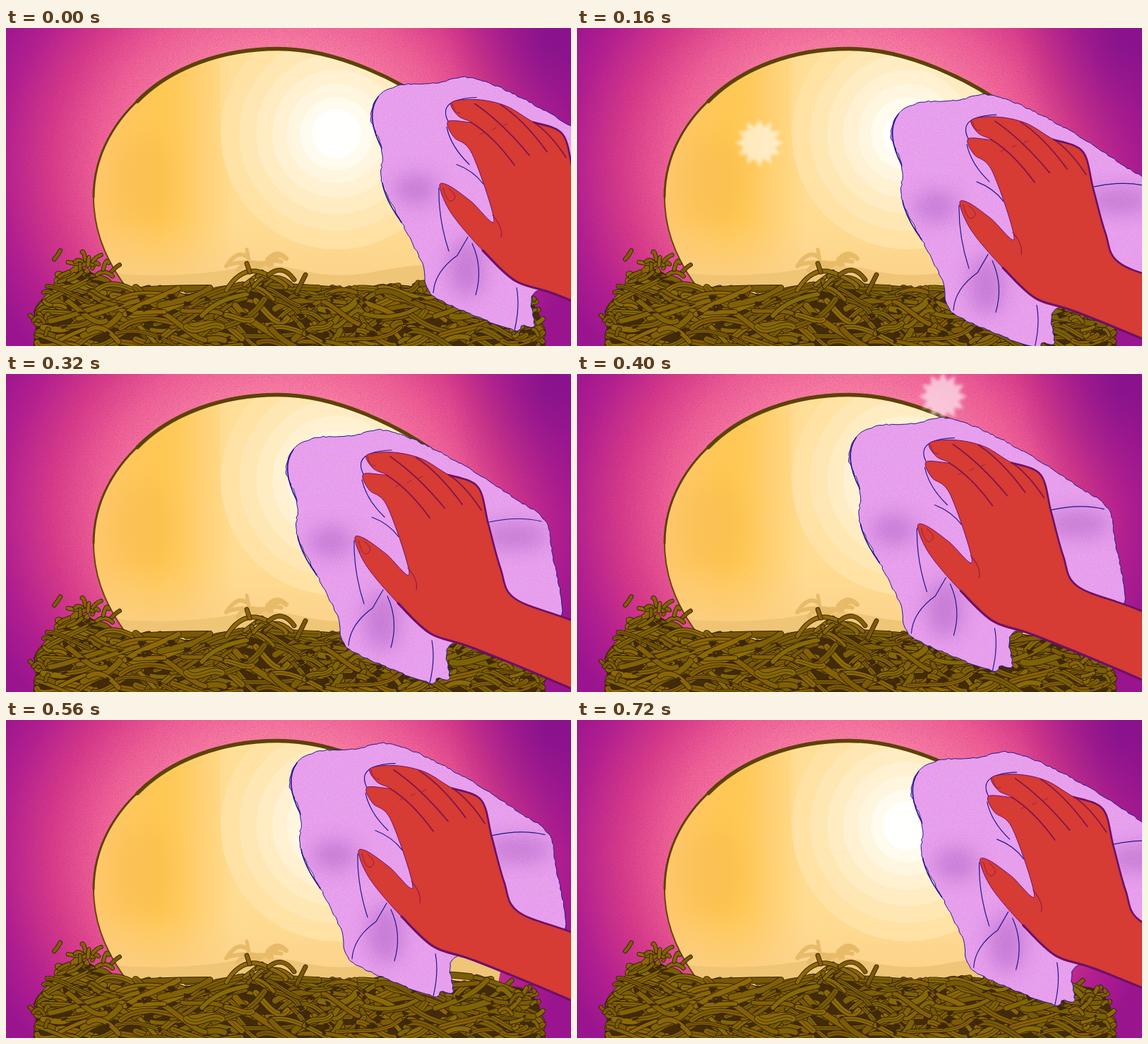
An HTML page for the animation above (0.8 s loop, 800 by 451 pixels).

```html
<!DOCTYPE html>
<html lang="en">
<head>
<meta charset="utf-8">
<title>Polishing the egg</title>
<style>
html,body{margin:0;width:100%;height:100%;overflow:hidden;background:#a0188f}
svg{display:block;width:100%;height:100%}
path{stroke-linecap:round;stroke-linejoin:round}
</style>
</head>
<body>
<svg viewBox="0 0 800 451" preserveAspectRatio="none">
<defs>
  <radialGradient id="sky" gradientUnits="userSpaceOnUse" cx="0" cy="0" r="1" gradientTransform="translate(385 195) scale(450 410)">
    <stop offset=".42" stop-color="#f97f9f"/><stop offset=".57" stop-color="#ef6293"/>
    <stop offset=".72" stop-color="#d63c86"/><stop offset=".87" stop-color="#b2218d"/>
    <stop offset="1" stop-color="#99168d"/>
  </radialGradient>
  <radialGradient id="dusk" gradientUnits="userSpaceOnUse" cx="0" cy="0" r="1" gradientTransform="translate(765 20) scale(140 180)">
    <stop offset="0" stop-color="#6c0f88" stop-opacity=".5"/><stop offset="1" stop-color="#7c1188" stop-opacity="0"/>
  </radialGradient>
  <linearGradient id="shell" gradientUnits="userSpaceOnUse" x1="124" y1="0" x2="324" y2="0">
    <stop offset="0" stop-color="#fec76c"/><stop offset=".45" stop-color="#ffc752"/>
    <stop offset=".62" stop-color="#ffcb5e"/><stop offset=".75" stop-color="#ffd071"/>
    <stop offset="1" stop-color="#ffdc92"/>
  </linearGradient>
  <linearGradient id="low" gradientUnits="userSpaceOnUse" x1="0" y1="270" x2="0" y2="360">
    <stop offset="0" stop-color="#fcd28a" stop-opacity="0"/><stop offset="1" stop-color="#fbd08a" stop-opacity=".85"/>
  </linearGradient>
  <filter id="grain" x="0" y="0" width="100%" height="100%">
    <feTurbulence type="fractalNoise" baseFrequency=".75" numOctaves="2" seed="4"/>
    <feColorMatrix values="0 0 0 0 .4  0 0 0 0 0  0 0 0 0 .45  2.4 0 0 0 -1.1"/>
  </filter>
  <filter id="soft" x="-60%" y="-60%" width="220%" height="220%"><feGaussianBlur stdDeviation="14"/></filter>
  <filter id="glow" x="-30%" y="-30%" width="160%" height="160%"><feGaussianBlur stdDeviation="2.2"/></filter>
  <clipPath id="eggClip"><path id="eggEdge"/></clipPath>
  <clipPath id="clothClip"><path id="clothEdge"/></clipPath>
</defs>
<rect width="800" height="451" fill="url(#sky)"/>
<rect width="800" height="451" fill="url(#dusk)"/>
<rect width="800" height="451" filter="url(#grain)" opacity=".32"/>
<g id="egg"></g>
<path id="star" fill="#fff" filter="url(#glow)"/>
<g id="nest"></g>
<g id="wipe"></g>
</svg>
<script>
const STEP = 80, STEPS = 10;
const $ = id => document.getElementById(id);
const fix = v => v.toFixed(1);
const repeat = (n, draw) => Array.from({ length: n }, (_, i) => draw(i)).join('');

let seed = 11;
const rnd = (a, b) => {
  seed = (seed * 16807) % 2147483647;
  return a + (b - a) * seed / 2147483647;
};

// Smooth curve through "x,y x,y ..."
function curve(text, closed) {
  const p = text.trim().split(/\s+/).map(q => q.split(',').map(Number)), n = p.length;
  const at = i => closed ? p[(i + n) % n] : p[Math.max(0, Math.min(n - 1, i))];
  let d = 'M' + p[0];
  for (let i = 0; i < (closed ? n : n - 1); i++) {
    const [a, b, c, e] = [at(i - 1), at(i), at(i + 1), at(i + 2)];
    const handle = (o, from, to) => o.map((v, k) => fix(v + (to[k] - from[k]) / 6));
    d += `C${handle(b, a, c)} ${handle(c, e, b)} ${c}`;
  }
  return d + (closed ? 'Z' : '');
}

// Frayed version of a closed path
function fray(d, amp) {
  const path = document.createElementNS('http://www.w3.org/2000/svg', 'path');
  path.setAttribute('d', d);
  const n = Math.round(path.getTotalLength() / 4.5);
  const dots = Array.from({ length: n }, (_, i) => {
    const q = path.getPointAtLength(i * 4.5);
    return fix(q.x + rnd(-amp, amp)) + ',' + fix(q.y + rnd(-amp, amp));
  });
  return 'M' + dots.join('L') + 'Z';
}

const shape = (d, fill, more = '') => `<path d="${d}" fill="${fill}" ${more}/>`;
const line = (d, color, width, more = '') =>
  shape(d, 'none', `stroke="${color}" stroke-width="${width}" ${more}`);
const blob = (x, y, rx, ry, fill, more = '') =>
  `<ellipse cx="${x}" cy="${y}" rx="${rx}" ry="${ry}" fill="${fill}" ${more}/>`;
const arc = (x, y, dx, dy, lift) =>
  `M${fix(x)} ${fix(y)}q${fix(dx / 2)} ${fix(dy / 2 - lift)} ${fix(dx)} ${fix(dy)}`;

function drawEgg() {
  const left = 'M175 374C140 330 124 285 124 240', crown = 'C124 123 241 29 385 29C470 29 560 75 610 112';
  $('eggEdge').setAttribute('d', left + crown + 'C720 195 715 310 690 400L230 410Z');
  const glow = repeat(7, i => {
    const r = 164 - 27 * i + .9 * i * i;
    return blob(468, 150, r, r, `rgb(255,${Math.min(255, 226 + 5 * i)},${164 + 15 * i})`);
  });
  const shade = '#e8bb69';
  $('egg').innerHTML = `<g clip-path="url(#eggClip)">
    <rect x="100" y="20" width="620" height="420" fill="url(#shell)"/>
    ${blob(195, 215, 45, 62, '#f5b84c', 'opacity=".35" filter="url(#soft)"')}
    <rect x="303" y="20" width="420" height="130" fill="#ffe0a0" opacity=".4"/>
    <rect x="100" y="260" width="620" height="160" fill="url(#low)"/>
    ${glow}
    ${shape('M140 346Q190 352 240 350T330 340T420 344T520 346T600 336H720V420H140Z', '#eec474', 'opacity=".85"')}
    ${repeat(7, () => line(arc(rnd(312, 385), rnd(328, 350), rnd(22, 48), rnd(-14, 8), rnd(4, 20)), shade, 6))}
    ${line('M344 330L341 314', shade, 5)}</g>
    ${line(left, '#6a4508', 2)}${line('M124 240' + crown, '#5c4206', 3)}
    ${line('M186 104C232 57 305 29.5 385 29.5C470 29.5 560 76 610 113', '#5c4206', 5.4)}`;
}

const bump = (x, at, width) => Math.exp(-(((x - at) / width) ** 2));
const roof = x => 368 - 36 * bump(x, 105, 42) - 18 * bump(x, 368, 30) - 9 * bump(x, 610, 60)
  + 75 * Math.exp((38 - x) / 9) + 75 * Math.exp((x - 766) / 11);

function drawNest() {
  const strand = (d, w) => line(d, '#35200a', w + 1.8) +
    line(d, `hsl(${rnd(42, 47)},92%,${rnd(24, 29)}%)`, w);
  const ridge = repeat(74, i => `L${40 + i * 9.8} ${fix(roof(40 + i * 9.8) + 9)}`);
  const mat = repeat(270, i => {
    const x = rnd(46, 757), y = roof(x) + rnd(0, 456 - roof(x));
    const turn = rnd(-.8, .8), len = rnd(18, 52);
    const at = (k, bend) => {
      const px = Math.max(44, Math.min(760, x + Math.cos(turn) * len * k));
      return fix(px) + ' ' + fix(Math.max(roof(px) + 1, y + Math.sin(turn) * len * k * .8 + bend));
    };
    const d = `M${at(-1, 0)}C${at(-.4, rnd(-20, 16))} ${at(.4, rnd(-16, 20))} ${at(1, rnd(-8, 8))}`;
    return strand(d, rnd(4.5, 8.5)) + (i % 2 ? line(d, '#4a3208', .8) : '');
  });
  const gaps = repeat(90, () => {
    const x = rnd(60, 745), y = roof(x) + rnd(10, 80), w = rnd(5, 15);
    return shape(arc(x, y, w, rnd(-6, 6), rnd(2, 5)) + `l${fix(-w * .7)} ${fix(rnd(2, 5))}Z`, '#3e2708');
  });
  // Loose curls that stand up from the mat
  const tuft = (n, x, y, w, h, size) => repeat(n, () =>
    strand(arc(x + rnd(0, w), y + rnd(0, h), rnd(-size, size), rnd(-size, size) * .6, rnd(-4, 14)), 4.4));
  $('nest').innerHTML = shape('M38 460' + ridge + 'L766 460Z', '#432b08') + mat + gaps +
    tuft(16, 66, 328, 84, 28, 24) + tuft(7, 46, 380, 16, 62, 16) +
    tuft(9, 700, 368, 50, 66, 18) + tuft(8, 325, 352, 60, 16, 32) +
    strand('M312 372Q335 334 368 349T396 368', 5) + strand('M372 350Q392 334 408 357', 5) +
    strand('M412 374L424 350', 5) + strand('M345 346L341 334', 5);
}

function drawWipe() {
  const ink = '#20188c', plum = '#6d1068';
  const cloth = fray(curve(`397,139 407,107 437,91 490,87 530,79 575,92 645,128 720,176 763,207
    773,250 783,355 700,365 628,385 628,432 612,431 600,438 545,418 482,387 470,345 440,285
    413,230 412,180`, true), 1);
  $('clothEdge').setAttribute('d', cloth);
  const hand = curve(`940,404 800,349 720,318 700,275 683,213 668,160 627,143 588,120 547,111
    511,115 520,134 538,143 506,142 514,164 540,188 571,283 538,255 507,233 494,234 511,273
    555,325 601,368 660,388 800,446 940,510`, true);
  const folds = ['M493 236Q492 280 507 326', 'M485 385Q487 355 519 332L534 306', 'M540 315Q556 350 545 388',
    'M603 378Q608 405 600 438', 'M684 210Q725 201 758 209', 'M506 142Q490 110 546 108',
    'M504 150Q510 178 536 203', 'M518 203Q542 212 556 231'];
  const knuckles = [arc(544, 117, 77, 73, 10), arc(538, 143, 62, 61, 12),
    arc(580, 118, 66, 67, 12), arc(627, 143, 46, 50, 10)];
  const shadow = (x, y, rx, ry) => blob(x, y, rx, ry, '#b76dcb', 'opacity=".65" filter="url(#soft)"');
  $('wipe').innerHTML = shape(cloth, '#e9a3ee', `stroke="${ink}" stroke-width="1"`) +
    `<g clip-path="url(#clothClip)">
      ${shadow(460, 238, 32, 22)}${shadow(532, 350, 26, 42)}${shadow(720, 230, 48, 19)}
      <rect x="385" y="70" width="405" height="375" filter="url(#grain)" opacity=".14"/></g>` +
    line('M407 107Q388 133 412 180', ink, 1.6) + line('M413 230Q418 255 440 285', ink, 1.6) +
    folds.map(d => line(d, ink, 1.2)).join('') +
    shape(hand, '#d63b34', `stroke="${plum}" stroke-width="1"`) +
    line(curve('627,143 668,160 683,213 700,275 720,318 800,349 940,404'), plum, 2.6) +
    line(curve('555,325 601,368 660,388 800,446 940,510'), plum, 3.2) +
    knuckles.map(d => line(d, '#7d144f', 1.7)).join('') +
    line('M499 236Q505 260 513 254T507 237', '#8e1a40', .9) +
    line('M512 117Q515 133 523 130', '#8e1a40', .9) + line('M569 275Q584 292 581 306', '#8e1a40', 1.1) +
    repeat(3, i => line(arc(552 + 16 * i, 160 - 6 * i, 6, -3, 0), '#8e1a40', .8));
}

// Sweep left, lift, then a parabolic return
function sweep(i) {
  if (i < 4) return [120 - 36 * i, -9.5 + 12.3 * i];
  if (i < 7) return [-11.6 * (i - 4), -17.25 * (i - 4)];
  const k = i - 6;
  return [-23 + 25.4 * k + 2.6 * k * k, -34.5 - 17.8 * k + 6 * k * k];
}

const sparkles = [{ from: 2, x: 258, y: 163 }, { from: 5, x: 518, y: 32 }];

function sparkle(i) {
  const s = sparkles.find(s => i >= s.from && i < s.from + 2);
  if (!s) return $('star').setAttribute('opacity', 0);
  const big = i > s.from, r = big ? 52 : 34, n = 12;
  const dots = Array.from({ length: n * 2 }, (_, k) => {
    const a = Math.PI * k / n, q = k % 2 ? r * .68 : r;
    return fix(s.x + q * Math.sin(a)) + ' ' + fix(s.y - q * Math.cos(a));
  });
  $('star').setAttribute('d', 'M' + dots.join('L') + 'Z');
  $('star').setAttribute('opacity', big ? 1 : .6);
}

let shown = -1;
function render(ms) {
  const i = Math.floor(ms / STEP) % STEPS;
  if (i === shown) return;
  shown = i;
  $('wipe').setAttribute('transform', `translate(${sweep(i).map(fix)})`);
  sparkle(i);
}

drawEgg();
drawNest();
drawWipe();
const start = performance.now();
(function tick() {
  render(performance.now() - start);
  requestAnimationFrame(tick);
})();
</script>
</body>
</html>
```
